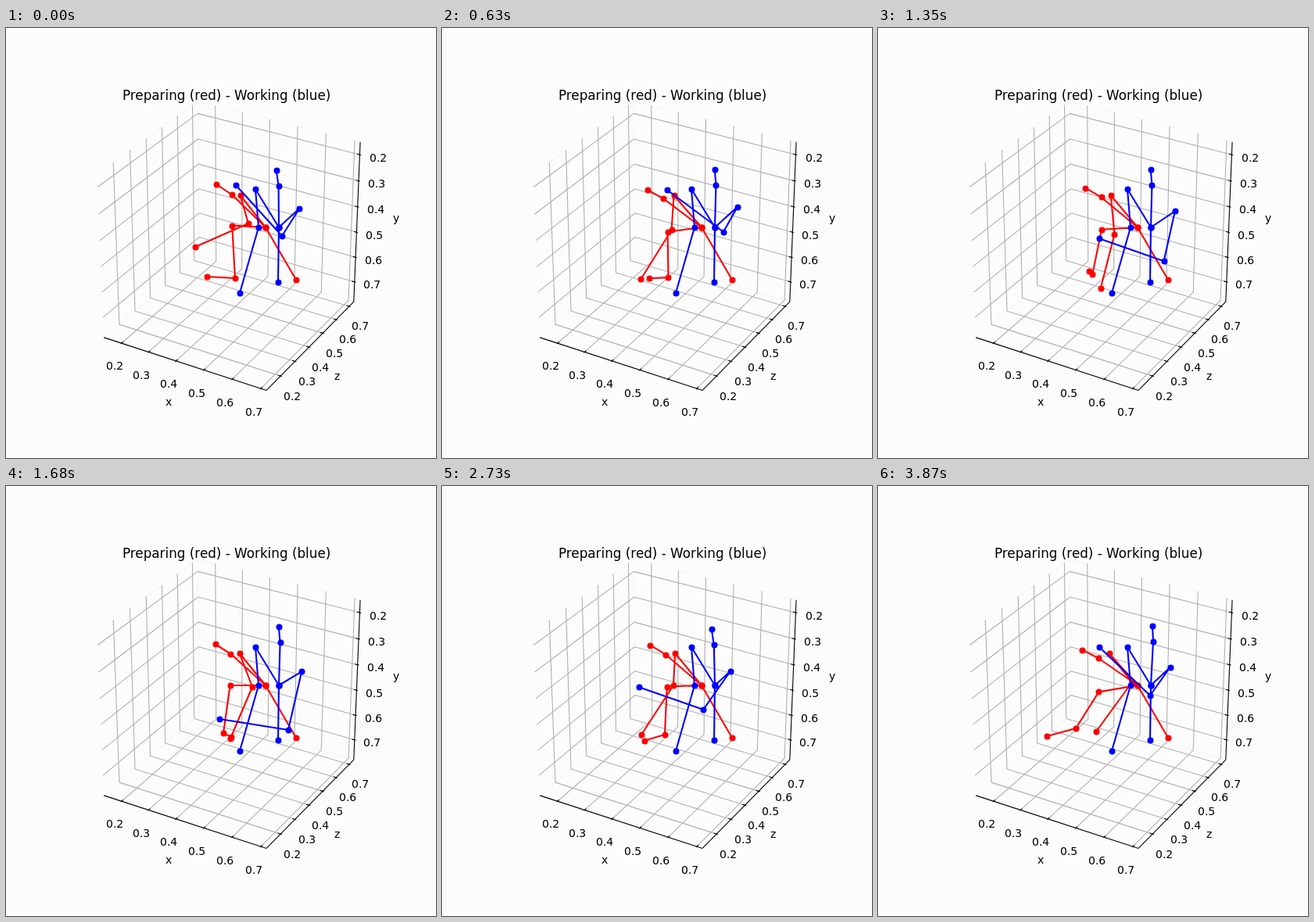
Recreate the animation shown at these times as an HTML page with a canvas. Size 550x550 px, loop 3.9 s.

```html
<!DOCTYPE html>
<html lang="en">
<head>
<meta charset="utf-8">
<title>Preparing - Working</title>
<style>
html, body { margin: 0; height: 100%; overflow: hidden; background: #fcfcfc; }
canvas { display: block; }
</style>
</head>
<body>
<canvas id="stage" width="550" height="550"></canvas>
<script>
const LOOP = 3900, STEP = 30;
const ctx = document.getElementById('stage').getContext('2d');

// Perspective view of a unit cube centred on the origin (azimuth -60, elevation 30).
function project([x, y, z]) {
  const c = Math.sqrt(3) / 2;
  const depth = 10 - (c / 2 * x - 0.75 * y + 0.5 * z);
  return [
    287.6 + 2304 * (c * x + 0.5 * y) / depth,
    272 - 2289 * (-0.25 * x + c / 2 * y + c * z) / depth
  ];
}

function stroke(points, color, width) {
  ctx.beginPath();
  points.forEach(([x, y]) => ctx.lineTo(x, y));
  ctx.strokeStyle = color;
  ctx.lineWidth = width;
  ctx.stroke();
}

const line3d = (points, color) => stroke(points.map(project), color, 1.11);

// Text centred on x, set on whole pixels.
function text(s, x, y, size = 14) {
  ctx.font = `${size}px "DejaVu Sans", sans-serif`;
  ctx.fillText(s, Math.round(x - ctx.measureText(s).width / 2), Math.round(y));
}

const E = 0.5208, LABEL = 0.596, OUT = E + 0.0083, IN = E - 0.0167;

// Each axis: place of 0.2, spacing of ticks, and its geometry at tick place p.
const axes = [
  { start: -0.403, gap: 0.178,
    grid: p => [[p, -E, -E], [p, E, -E], [p, E, E]],
    tick: p => [[p, -OUT, -E], [p, -IN, -E]],
    label: p => [p, -LABEL, -LABEL],
    edge: [[-E, -E, -E], [E, -E, -E]] },
  { start: -0.363, gap: 0.165,
    grid: p => [[E, p, -E], [-E, p, -E], [-E, p, E]],
    tick: p => [[OUT, p, -E], [IN, p, -E]],
    label: p => [LABEL, p, -LABEL],
    edge: [[E, -E, -E], [E, E, -E]] },
  { start: 0.442, gap: -0.1656,
    grid: p => [[-E, -E, p], [-E, E, p], [E, E, p]],
    tick: p => [[OUT, E, p], [IN, E, p]],
    label: p => [LABEL, LABEL, p],
    edge: [[E, E, -E], [E, E, E]] }
];

function drawAxes() {
  ctx.fillStyle = '#000';
  line3d([[-E, -E, E], [-E, E, E], [E, E, E]], '#f5f5f5');
  line3d([[-E, -E, -E], [-E, E, -E], [E, E, -E]], '#f5f5f5');
  line3d([[-E, E, -E], [-E, E, E]], '#f5f5f5');
  const ticks = a => [0, 1, 2, 3, 4, 5].map(i => a.start + i * a.gap);
  for (const a of axes) ticks(a).forEach(p => line3d(a.grid(p), '#b0b0b0'));
  for (const a of axes) {
    line3d(a.edge, '#000');
    ticks(a).forEach((p, i) => {
      line3d(a.tick(p), '#000');
      const [x, y] = project(a.label(p));
      text('0.' + (i + 2), x, y + 11.5);
    });
  }
  text('x', 208, 483);
  text('z', 424, 450);
  text('y', 499, 248);
  text('Preparing (red) - Working (blue)', 282, 92, 16.8);
}

// A smooth curve through one value per key time.
const TIMES = [0, 300, 1020, 1680, 2280, 3240, 3870];

function track(...values) {
  const last = TIMES.length - 1;
  const tangent = k => {
    const a = Math.max(k - 1, 0), b = Math.min(k + 1, last);
    return (values[b] - values[a]) / (TIMES[b] - TIMES[a]);
  };
  return t => {
    let i = 0;
    while (i < last - 1 && t >= TIMES[i + 1]) i++;
    const h = TIMES[i + 1] - TIMES[i], u = (t - TIMES[i]) / h, v = 1 - u;
    return v * v * ((1 + 2 * u) * values[i] + u * h * tangent(i)) +
           u * u * ((3 - 2 * u) * values[i + 1] - v * h * tangent(i + 1));
  };
}

const path = (x, y) => t => [x(t), y(t)];

// Red: the lean moves head and shoulders, the hands and elbows swing freely.
const lean = track(-1.1, 0.6, 0.8, -0.5, -0.6, 0.6, 1.6);
const nearElbow = path(track(310, 302, 289, 315, 294, 305, 325), track(250, 248, 269, 257, 267, 241, 251));
const nearHand = path(track(242, 237, 276, 287, 273, 242, 279), track(280, 299, 340, 323, 336, 298, 314));
const farElbowX = track(293, 303, 273, 278, 269, 298, 253);
const farHand = path(track(257, 280, 249, 288, 237, 284, 216), track(318, 333, 305, 321, 323, 327, 320));

function redLimbs(t) {
  const k = lean(t), ex = farElbowX(t), neck = [332, 255];
  return [
    [[266 - 3 * k, 204 + 3.5 * k], [286 - 2.8 * k, 216 + 2.5 * k], neck, [371, 322]],
    [neck, [298 - 1.5 * k, 214], nearElbow(t), nearHand(t)],
    [neck, [287 + 0.17 * (ex - 280), 257 + 4 * k], [ex, 317 + 0.25 * (ex - 281)], farHand(t)]
  ];
}

// Blue: only one arm works; its shoulder follows the elbow and the head sways.
const sway = track(-0.7, 0.3, 0, 0.3, -1, -0.7, 1);
const workElbow = path(track(353, 353, 367, 361, 350, 322, 348), track(266, 250, 280, 312, 302, 269, 268));
const workHand = path(track(294, 285, 291, 273, 266, 243, 283), track(201, 192, 234, 298, 282, 228, 206));

function blueLimbs(t) {
  const k = sway(t), neck = [349, 255], elbow = workElbow(t);
  const dx = elbow[0] - 352, dy = elbow[1] - 278;
  return [
    [[348 + 3 * k, 181 - 2 * k], [350 + 2 * k, 201 - 2 * k], neck, [348, 325]],
    [neck, [319, 206], [323, 255], [299, 339]],
    [neck, [375 + 0.35 * dx, 233 + 0.17 * dy - 0.15 * dx], elbow, workHand(t)]
  ];
}

function drawBody(limbs, color) {
  ctx.fillStyle = color;
  for (const limb of limbs) {
    stroke(limb, color, 2.08);
    for (const [x, y] of limb) {
      ctx.beginPath();
      ctx.arc(Math.round(x) + 0.5, Math.round(y) + 0.5, 4, 0, 2 * Math.PI);
      ctx.fill();
    }
  }
}

const begin = performance.now();

function frame(now) {
  const t = Math.floor(Math.max(0, now - begin) % LOOP / STEP) * STEP;
  ctx.fillStyle = '#fcfcfc';
  ctx.fillRect(0, 0, 550, 550);
  ctx.lineJoin = 'round';
  drawAxes();
  drawBody(redLimbs(t), '#f00');
  drawBody(blueLimbs(t), '#00f');
  requestAnimationFrame(frame);
}
frame(begin);
</script>
</body>
</html>
```
